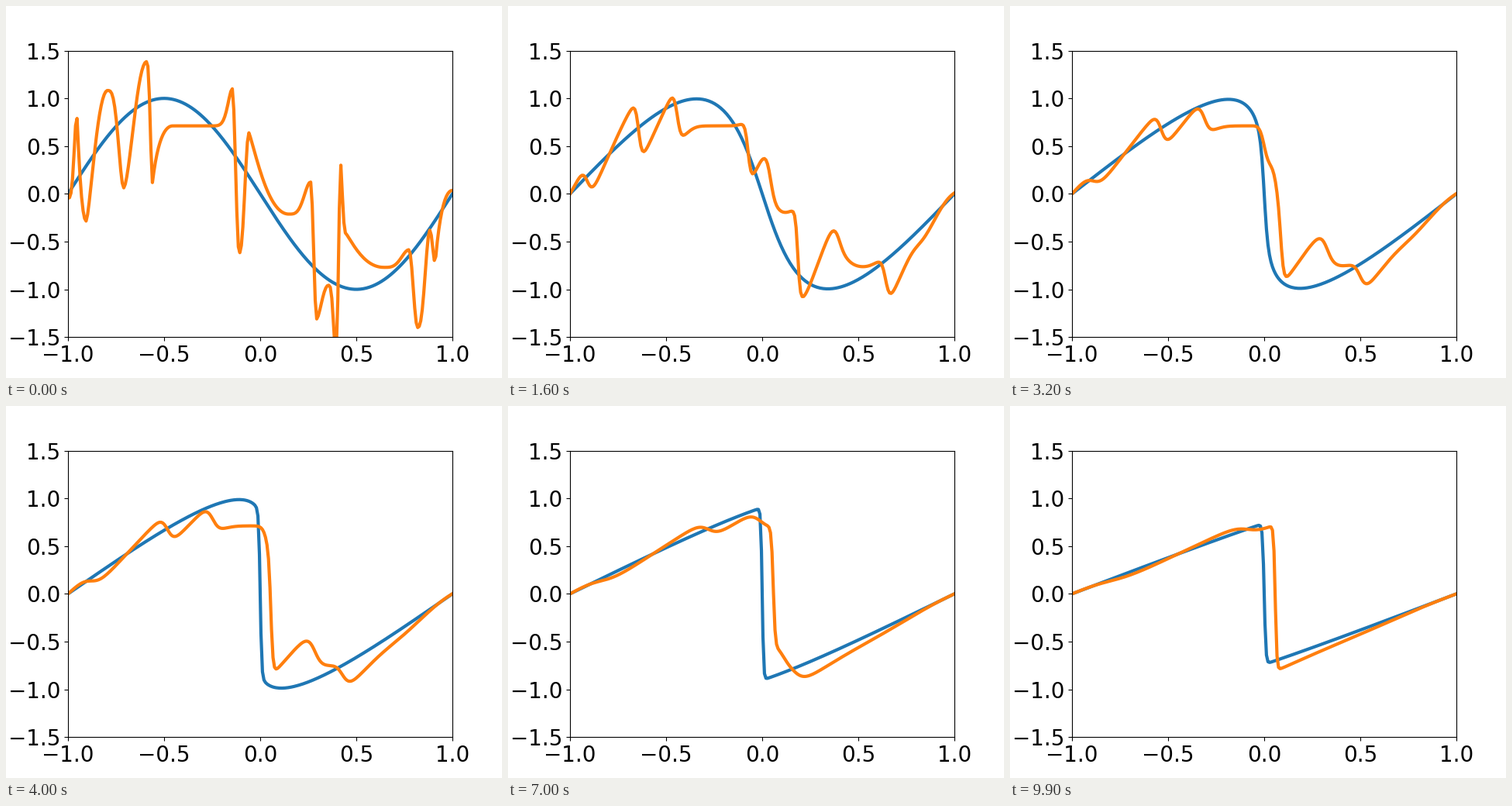
Recreate the animation shown at these times as a matplotlib script. Size 640 by 480 pixels, loop 10 s.

```python
import numpy as np
import matplotlib.pyplot as plt
from matplotlib.animation import FuncAnimation

FRAMES = 100
FRAME_DT = 0.01              # model time per frame
SUBSTEPS = 50
NU = 0.01 / np.pi            # viscosity
REFINE = 4                   # solver cells per plotted segment

plt.rcParams.update({"font.family": "DejaVu Sans", "font.size": 20})

# Turning points of the perturbed wave: x, u, skew of the stroke leading there
TURNS = [
    (-1, -.045, 1), (-.954, .83, 1.7), (-.905, -.285, .55),
    (-.794, 1.083, .7), (-.71, .063, 1.6), (-.591, 1.385, .82),
    (-.56, .115, 1.35), (-.455, .712, .45), (-.27, .712, 1),
    (-.145, 1.1, 2.9), (-.109, -.62, .95), (-.059, .64, 1.2),
    (.149, -.212, .58), (.262, .125, 1.75), (.294, -1.31, 1),
    (.355, -.957, .8), (.393, -1.65, 1.6), (.419, .31, 1.2),
    (.444, -.41, .7), (.645, -.77, .57), (.774, -.585, 1.7),
    (.819, -1.4, 1), (.883, -.38, 1.3), (.911, -.725, 1), (1, .036, .47),
]


def skewed_wave(x, turns):
    """Join turning points with cosine strokes, each skewed by a power."""
    xk, uk, skew = np.array(turns).T
    i = np.clip(np.searchsorted(xk, x), 1, len(xk) - 1)
    s = (x - xk[i - 1]) / (xk[i] - xk[i - 1])
    ease = (1 - np.cos(np.pi * s ** skew[i])) / 2
    return uk[i - 1] + (uk[i] - uk[i - 1]) * ease


def rate(u, dx):
    """Right-hand side of u_t + u u_x = NU u_xx, fixed at both ends."""
    out = np.zeros_like(u)
    left, mid, right = u[:, :-2], u[:, 1:-1], u[:, 2:]
    out[:, 1:-1] = ((left ** 2 - right ** 2) / (4 * dx)
                    + NU * (left - 2 * mid + right) / dx ** 2)
    return out


def solve(u, dx):
    """Return both profiles at every frame on the plotted points."""
    dt = FRAME_DT / SUBSTEPS
    fade = np.exp(-dt / np.array([0.03, 0.12]))   # ends relax to zero
    frames = []
    for _ in range(FRAMES):
        frames.append(u[:, ::REFINE].copy())
        for _ in range(SUBSTEPS):
            k1 = rate(u, dx)
            k2 = rate(u + dt * k1, dx)
            u = u + dt / 2 * (k1 + k2)
            u[:, [0, -1]] *= fade
    return frames


grid = np.linspace(-1, 1, 255 * REFINE + 1)
start = np.array([-np.sin(np.pi * grid), skewed_wave(grid, TURNS)])
profiles = solve(start, grid[1] - grid[0])
x = grid[::REFINE]

fig, ax = plt.subplots(figsize=(6.4, 4.8), dpi=100)
ax.set(xlim=(-1, 1), ylim=(-1.5, 1.5),
       xticks=np.arange(-1, 1.1, 0.5), yticks=np.arange(-1.5, 1.6, 0.5))
lines = [ax.plot(x, u, color=c, lw=3)[0]
         for u, c in zip(profiles[0], ("C0", "C1"))]


def update(frame):
    for line, u in zip(lines, profiles[frame]):
        line.set_ydata(u)
    return lines


anim = FuncAnimation(fig, update, frames=FRAMES, interval=100, repeat=True,
                     repeat_delay=0)
plt.show()
```
